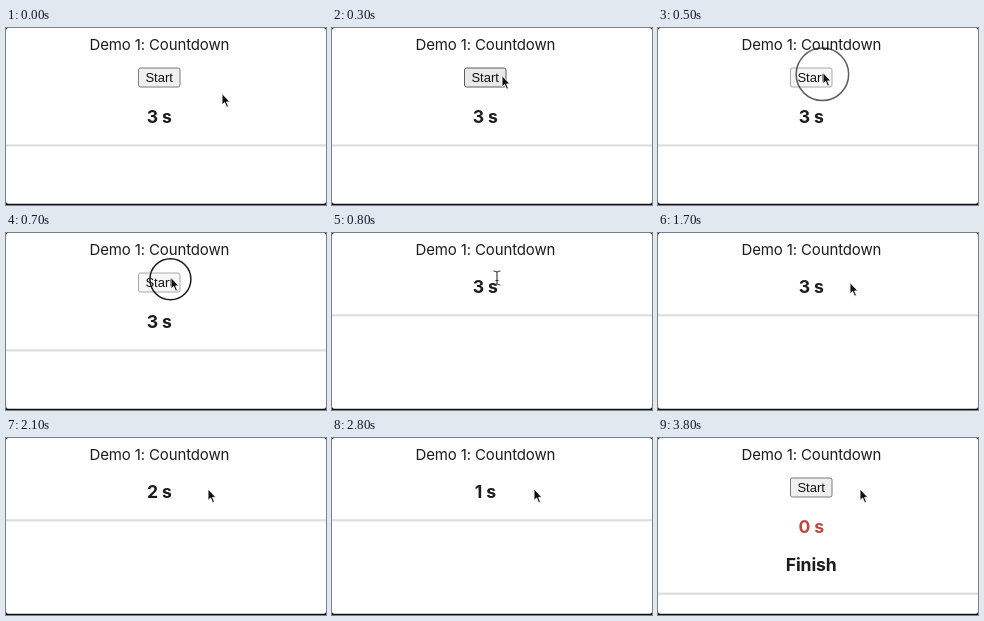
An HTML page that plays this animation: 320x177 px, repeating every 4.2 s.

```html
<!DOCTYPE html>
<html lang="en">
<head>
<meta charset="utf-8">
<title>Countdown</title>
<style>
html, body { margin: 0; width: 100%; height: 100%; overflow: hidden; background: #fff; }
svg { display: block; width: 100%; height: 100%; }
text { text-anchor: middle; fill: #1c1c1e; font-family: Inter, "Open Sans", sans-serif; }
.title { font-size: 15px; letter-spacing: -.13px; }
.big { font-size: 17.6px; font-weight: 700; letter-spacing: -.1px; }
.label { font-size: 13px; font-family: "Liberation Sans", Arial, sans-serif; fill: #111; }
</style>
</head>
<body>
<svg viewBox="0 0 320 177">
  <rect width="320" height="177" fill="#111"/>
  <rect width="320" height="175.8" rx="2.5" fill="#fff"/>
  <text class="title" x="153.4" y="21.7">Demo 1: Countdown</text>
  <g id="button">
    <rect id="face" x="132.5" y="40" width="41.5" height="19" rx="2"/>
    <text id="label" class="label" x="153.2" y="54.2">Start</text>
  </g>
  <text id="count" class="big" x="153.3"></text>
  <text id="finish" class="big" x="153.2" y="132.8">Finish</text>
  <rect id="rule" width="320" height="2.2" fill="#dedede"/>
  <circle id="ring" cx="164.4" cy="46.3" fill="none" stroke="#1a1a1a" stroke-width="1.5"/>
  <path id="arrow" d="M0 -.5V11L2.6 8.5L4.6 13.2L6.5 12.4L4.6 7.9H8Z"
    fill="#111" stroke="#fff" stroke-width=".9"/>
  <path id="beam" d="M-3.5 -7Q-.5 -7 0 -5.6Q.5 -7 3.5 -7M0 -5.6V5.6M-3.5 7Q-.5 7 0 5.6Q.5 7 3.5 7M-1.5 2.5H1.5"
    fill="none" stroke="#333" stroke-width="1.1"/>
</svg>
<script>
const LOOP = 4200, STEP = 100, START = 800;
const $ = id => document.getElementById(id);
const set = (id, attrs) => {
  for (const key in attrs) $(id).setAttribute(key, attrs[key]);
};
const show = (id, on) => set(id, { visibility: on ? 'visible' : 'hidden' });

// pointer keys: time, x, y
const path = [
  [0, 216, 66], [100, 210, 65], [200, 189, 56], [300, 170, 48], [400, 166, 46],
  [500, 165, 45], [1200, 165, 45], [1300, 165.4, 46], [1400, 168, 46.5], [1500, 175, 48],
  [1700, 192, 50], [1800, 196.5, 51], [1900, 199.5, 51.5], [2100, 202, 51.5], [LOOP, 202, 51.5]
];

function pointer(t) {
  const i = path.findIndex(p => p[0] > t);
  const [t0, x0, y0] = path[i - 1], [t1, x1, y1] = path[i];
  const k = (t - t0) / (t1 - t0);
  return [x0 + (x1 - x0) * k, y0 + (y1 - y0) * k];
}

function draw(ms) {
  const t = Math.floor(ms % LOOP / STEP) * STEP;
  const running = t >= START && t < 3800;
  const done = t >= 3800;
  const hover = t >= 300 && t < START;
  const pressed = t >= 500 && t < START;

  show('button', !running);
  set('face', {
    fill: pressed ? '#f7f7f7' : hover ? '#e9e9e9' : '#f0f0f0',
    stroke: pressed ? '#a8a8a8' : hover ? '#5c5c5c' : '#7b7b7b'
  });

  const left = t < START ? 3 : 3 - Math.floor((t - START) / 1000);
  $('count').textContent = left + ' s';
  $('count').style.fill = done ? '#bd493d' : '#1c1c1e';
  set('count', { y: running ? 60 : 95 });
  show('finish', done);
  set('rule', { y: running ? 81.2 : done ? 154.6 : 116.3 });

  const shrink = Math.min(1, Math.max(0, (t - 400) / 200));
  show('ring', t >= 400 && t < START);
  set('ring', { r: 32 - 11.5 * shrink, opacity: .4 + .6 * shrink });

  const beam = t >= START && t < 1500;
  const move = { transform: `translate(${pointer(t)})` };
  set('arrow', move);
  set('beam', move);
  show('arrow', !beam);
  show('beam', beam);
}

const begin = performance.now();
function tick() {
  draw(performance.now() - begin);
  requestAnimationFrame(tick);
}
tick();
</script>
</body>
</html>
```
